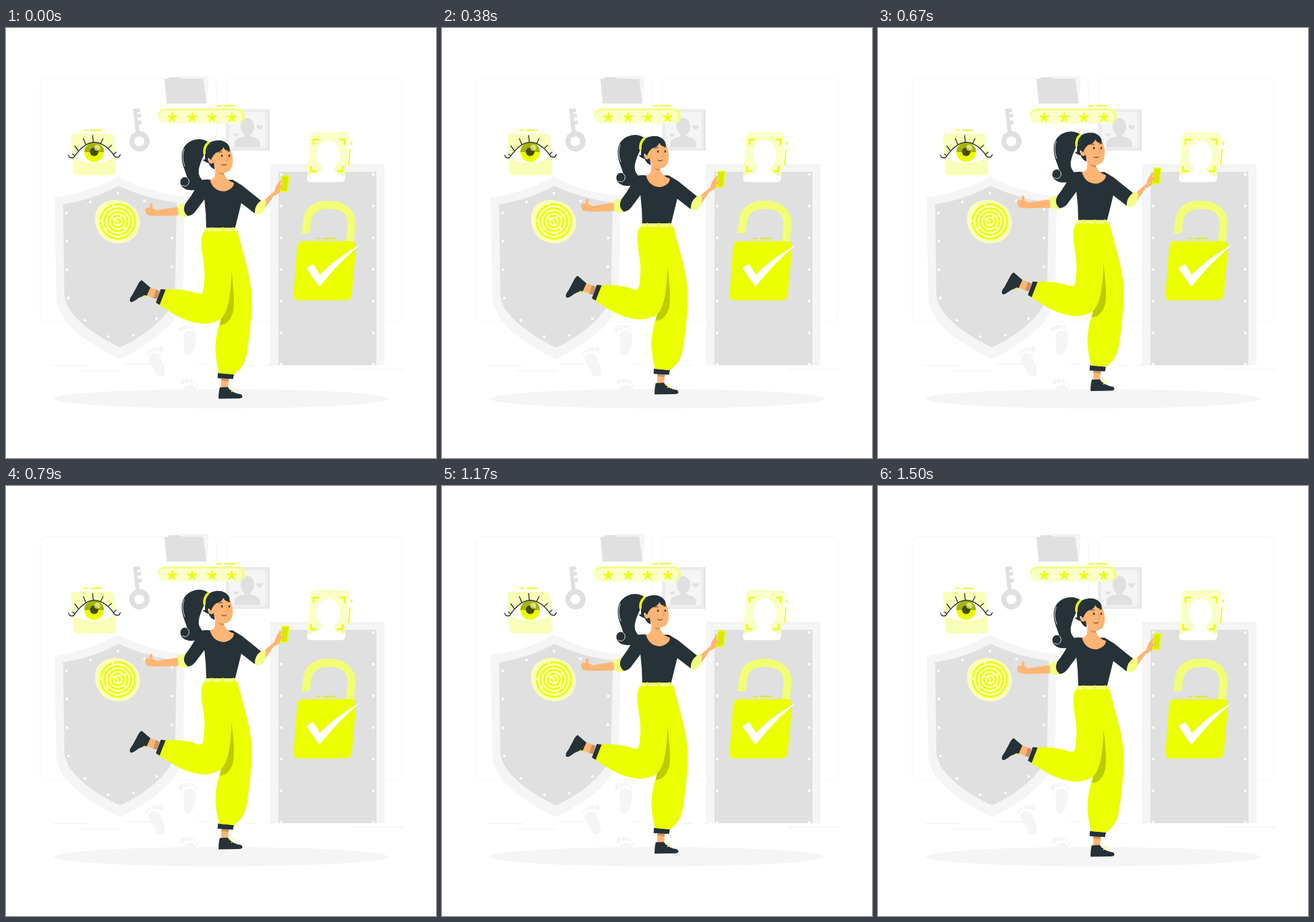
Recreate the animation shown at these times as an HTML page. Size 700 px wide and 700 px high, loop 1.54 s.

```html
<!DOCTYPE html>
<html lang="en">
<head>
<meta charset="utf-8">
<style>
  html, body { margin: 0; height: 100%; overflow: hidden; background: #fff; }
  svg { display: block; width: 100vw; height: 100vh; }
  .light { fill: #f5f5f5; }
  .grey { fill: #e0e0e0; }
  .yellow { fill: #ebff00; }
  .pale { fill: #f9ffb8; }
  .cuff { fill: #f3ff80; }
  .skin { fill: #ffb573; }
  .shade { fill: #cc915c; }
  .dark { fill: #263238; }
  .white { fill: #fff; }
  .line { fill: none; stroke-linecap: round; stroke-linejoin: round; }
  .glow { stroke: #ebff00; stroke-width: 2; }
  .ink { stroke: #263238; }
</style>
</head>
<body>
<svg viewBox="0 0 700 700">
  <!-- Room -->
  <g fill="none" stroke="#f5f5f5">
    <rect x="55.5" y="82.5" width="287" height="395.5" rx="9"/>
    <rect x="358.5" y="82.5" width="286" height="395.5" rx="9"/>
  </g>
  <path class="line" stroke="#ebebeb" stroke-width=".8" d="M76 549.5H132M121 558.5H186M193 546.5H238M313 546.5H325M392 549.5H407M425 549.5H432M563 555.5H649"/>
  <ellipse class="light" cx="350" cy="603.5" rx="272" ry="15.8"/>

  <!-- Folder -->
  <path class="light" d="M283 78H328L330 82 327 123H300Z"/>
  <path class="grey" d="M258 83H263L266 80H283L286 82.500H321L326.500 123H261.500Z"/>

  <!-- Portrait frame -->
  <path fill="#ebebeb" d="M358 132H429V200H358Z"/>
  <path class="grey" d="M427.500 132H429V200H427.500Z"/>
  <path class="light" d="M363.500 137H422.500V195H363.500Z"/>
  <g class="grey">
    <ellipse cx="393" cy="160.500" rx="11" ry="14"/>
    <path d="M372 194V187Q373 179 388 177V168H398V177Q413 179 413.500 187V194Z"/>
    <path id="heart" d="M413 166Q406 161 408 159 411 156 413 160 416 156 418 159 420 161 413 166"/>
    <use href="#heart" transform="translate(65 53) scale(.75)"/>
  </g>

  <!-- Key -->
  <g class="grey">
    <path d="M207 132 217 130.500 219 136.500 213.500 137.500 214 140 219.500 139.500 220 145 214.500 146 215 151 221 150.500 221.500 156 216 157 218 170H211Z"/>
    <circle cx="217.300" cy="184.500" r="16.500"/>
    <circle class="white" cx="217" cy="184.500" r="8"/>
  </g>

  <!-- Shield -->
  <path class="light" d="M182 242Q140 267 79 276L82 440C85 483 140 517 185 539 230 517 286 480 288 440L291 274Q232 268 182 242"/>
  <path class="grey" d="M183 257Q143 279 93 287L95 434C97 470 150 503 185 520 225 503 273 465 275 433L278 284Q228 278 183 257"/>

  <!-- Door -->
  <path class="light" d="M430 221H616V549H430Z"/>
  <path class="grey" d="M443.500 234H603V549H443.500Z"/>
  <g id="rivets" class="white"></g>

  <!-- Fingerprint -->
  <path class="pale" d="M145 309C146 288 163 279 180 280 204 281 218 299 218 317 217 339 201 351 182 350.500 160 350 144 332 145 309"/>
  <g id="rings" class="line" stroke="#ebff00" stroke-width="3.200"></g>

  <!-- Password -->
  <rect x="247" y="131" width="142" height="24.500" rx="12.200" fill="#faffc8"/>
  <path fill="#f3ff80" d="M259 131H377Q387 132 389 143 388 153 379 155 386 148 383 140 381 134 374 134H262Q252 134 247 143 248 133 259 131"/>
  <g id="stars" class="line" stroke="#ebff00" stroke-width="3"></g>
  <path class="line glow" d="M344 127H350M356 126.500H372M127 166.500H132M138 166.500H155M561.500 186V189.500M560 198 558 222"/>

  <!-- Eye -->
  <path class="pale" d="M113 172H168Q175 172 176 179L179.500 233Q180 240 173 240H117Q110 240 109.500 233L106 179Q106 172 113 172"/>
  <path class="white" d="M110 211Q127 186 144 186 163 187 178 209 164 219 144 219 124 220 110 211"/>
  <circle class="yellow" cx="143.500" cy="202" r="16"/>
  <path fill="#a5b300" d="M127.500 202A16 16 0 0 1 159.500 202Z"/>
  <circle fill="#474d00" cx="143.500" cy="201.500" r="7"/>
  <circle fill="#f9ffb8" opacity=".65" cx="148.500" cy="195" r="5"/>
  <path class="line ink" stroke-width="1.500" d="M102 207Q103 213 110 211 127 186 144 186 162 187 177 209 184 213 186 206M118 200 112 192M130 190 126 180M142 186 141 175M154 188 158 180M166 196 172 191M112 208 108 205M175 206 179 202"/>

  <!-- Face scan -->
  <path class="pale" opacity=".8" d="M502 169.500H552Q559 170 558 178L552.500 244Q552 251 545 251H496Q489 251 490 243L495 177Q496 170 502 169.500"/>
  <ellipse class="white" cx="525" cy="207" rx="19" ry="23.500"/>
  <path class="white" d="M515 222H534V231Q536 237 552 242L551.500 246Q551 251 545 251H496Q490 251 490 244 491 240 504 237 515 234 515 222"/>
  <path class="line" stroke="#ebff00" stroke-width="3" stroke-linecap="butt" d="M500.500 189V181.500H508M544 181.500H551.500L551 189M496.500 226 496 233H504M540 233H547.500L548.500 226"/>

  <!-- Padlock -->
  <path fill="#f3ff73" d="M481 334 484 312C487 291 502 281 525 281 552 281 569 297 569 317L566 350H553.500L556 317C556 303 546 294 525 294.500 507 295 499 302 497 313L494 334Z"/>
  <path class="yellow" d="M483 347H562Q571 348 570 357L563 434Q562 443 553 443.500H476Q467 443 468 434L474 356Q475 348 483 347"/>
  <path class="line" stroke="#dcee00" stroke-width="2" d="M507 342.500H512M518 342.500H535"/>
  <path class="white" d="M489 391 500 384 511 402Q536 375 577 352.500 541 382 510 421.500Z"/>

  <!-- Footprints -->
  <g class="light">
    <path d="M289 500C290 490 310 489 310 503 309 515 305 530 299 533 289 535 288 526 290 518Z"/>
    <path d="M233 542C229 530 244 525 251 534 253 543 259 553 259 562 256 570 246 569 243 560 241 553 236 550 233 542"/>
    <path d="M289 591C289 579 307 577 310 588Z"/>
  </g>
  <g id="toes" class="light"></g>

  <!-- Woman -->
  <g id="woman">
    <path class="dark" d="M330 186Q316 177 301 184C283 193 284 214 290 229Q294 240 295 244 290 241 286 245C280 252 287 265 303 264 319 264 325 255 319 247 314 240 309 235 322 207Z"/>
    <path class="line" stroke="#fff" stroke-width=".9" d="M290 197Q285 211 291 225M295 244Q300 248 297 254 293 260 287 256"/>

    <path class="skin" d="M284 291Q260 294 245 297L238 293Q240 286 236 285 233 286 234 293 228 291 228 294 225 294 227 298 227 304 232 305L246 306 285 305Z"/>
    <path class="skin" d="M417 283 437 266Q439 255 447 249L450 254 448 265Q443 271 436 273L422 293Z"/>
    <path class="yellow" d="M448.500 240 461 239.500 459 266.500 446 267.500Z"/>
    <path fill="#d7e900" d="M450 242 459.500 241.500 457.500 264.500 448 265.500Z"/>
    <path class="skin" d="M440 257 447 247 448 250 446 257 450 256 451 259 445 263Z"/>

    <path class="shade" d="M239 424 250 428 246 441 240 440Z"/>
    <path class="skin" d="M234 422 244 426 240 440 229 435Z"/>
    <path class="dark" d="M221 410.500 235 422.500 229 436Q219 436 211 443 204 448 202 445 200 441 206 434L214 419Q217 412 221 410.500"/>
    <path class="line" stroke="#ebff00" stroke-width="1.500" d="M223 437Q228 434 228 438"/>
    <path class="dark" d="M252 425 260.500 426 252 452 244 447Z"/>

    <path class="skin" d="M351 569H363L361 588H350Z"/>
    <path class="shade" d="M351 570H363L362 575 350.500 574Z"/>
    <path class="dark" d="M348 585 361 584.500Q369 595 383 596.500 388 602 380 603L346 603.500Q346 592 348 585"/>
    <path class="line" stroke="#f3ff80" stroke-width="1.500" d="M364 588Q371 584 372 590L367 592"/>
    <path class="dark" d="M345 561.500 371 564 369.500 571.500 344.500 570Z"/>

    <path class="yellow" d="M323 330C314 342 319 362 321 378 325 400 322 411 322 421 321 433 317 434 311 432 290 425 273 425 260 425.500L250 451C277 470 297 479 319 481.500Q338 482 350 473C343 495 341 510 341 523 342 541 344 552 347 562L371 564C386 553 391 541 393 523Q400 480 400 437C398 401 386 370 377 330Z"/>
    <path fill="#bccc00" d="M367 395Q373 441 370 461 364 483 348 483.500L350 473Q366 459 367 395"/>

    <path class="cuff" d="M278 290Q284 285 294 286 288 297 297 307 288 309 280 305 281 297 278 290"/>
    <path class="cuff" d="M413 281Q418 278 423 281 424 301 410 304L404 301Q403 290 413 281"/>
    <path class="dark" d="M320 247Q326 246 334 247H369L384 256 415 281Q404 289 405 302L383 285 373 325.500H326Q326 302 323 279L311 295Q305 305 296 306 286 298 292 286 303 272 310 258 314 249 320 247"/>
    <path class="skin" d="M341 226 340 241Q338 246 332 247 337 266 356 266 371 262 371 252 358 248 355 237V225Z"/>
    <path class="shade" d="M345 234Q350 237 355 235.500L354 239Q348 239 345 234"/>
    <path class="cuff" d="M325 325H374L376 331H323Z"/>
    <path class="line" stroke="#ebff00" stroke-width="2" d="M334.500 325V331M353 325V331M370 325 371 331"/>

    <path class="skin" d="M334 204Q341 193 352 192L365 198C372 213 370 230 361 234Q349 239 341 228L337 221Q330 221 329 215 331 210 335 213Z"/>
    <path class="dark" d="M324 205C320 191 334 182 347 183 357 183 366 191 364 200Q356 200 354 194 350 202 342 203 336 208 334 215 326 207 330 218 333 223 338 219L340 230Q333 228 330 220 323 218 320 214 324 215 324 213Z"/>
    <path class="line" stroke="#ebff00" stroke-width="4" stroke-linecap="butt" d="M329 187Q322 193 323 204"/>
    <path class="line" stroke="#263238" stroke-width="1" d="M347 203Q349 200 352 202M361 201 365 200M351 222Q355 225 359 222"/>
    <path class="line" stroke="#e8945b" stroke-width="1" d="M359 208Q362 214 361 216L358 216"/>
    <ellipse class="dark" cx="351.500" cy="208" rx="1.300" ry="2"/>
    <ellipse class="dark" cx="363.500" cy="208" rx="1.300" ry="2"/>
  </g>
</svg>
<script>
const byId = id => document.getElementById(id);
const dots = (id, points, rx, ry = rx) => {
  byId(id).innerHTML += points.map(([x, y]) =>
    `<ellipse cx="${x}" cy="${y}" rx="${rx}" ry="${ry}"/>`).join('');
};

dots('rivets', [
  [182, 269], [137.500, 283], [225.500, 281.500], [98.500, 301], [270.500, 295.500],
  [99, 347], [270.500, 342], [99.500, 393.500], [270, 388.500], [101.500, 439.500],
  [128.500, 476], [166.500, 502.500], [207.500, 500], [245, 473], [269, 437]
], 2.200);
for (let i = 0; i < 7; i++) {
  const y = 238.500 + i * 51.500;
  dots('rivets', [[448, y], [598, y]], 2.200);
}

// Toes fan out above each sole.
const foot = (x, y, angle) => {
  const tips = [[-13, 3], [-6, 0], [0, -1], [6, 0], [11, 4]];
  byId('toes').innerHTML += tips.map(([dx, dy], i) =>
    `<ellipse cx="${dx}" cy="${dy}" rx="${3.400 - i * .45}" ry="${4.500 - i * .55}"
      transform="translate(${x} ${y}) rotate(${angle})"/>`).join('');
};
foot(297.500, 487, 0);
byId('toes').innerHTML += [[252.500, 523.500, 4, 5], [245.500, 522.500, 2.800, 4],
  [239.500, 523.500, 2.400, 3.500], [234, 526.500, 2.200, 3], [230, 530.500, 1.800, 2.300]]
  .map(([x, y, rx, ry]) => `<ellipse cx="${x}" cy="${y}" rx="${rx}" ry="${ry}"/>`).join('');
foot(301, 575.500, 10);

byId('rings').innerHTML = [3.500, 9.500, 15.500, 21.500, 28].map((r, i) => {
  const arc = r * 2.090;
  return `<circle cx="182" cy="315" r="${r}" stroke-dasharray="${arc - 5} 5 ${arc * .5} 5 ${arc * 1.500 - 5} 0"
    transform="rotate(${i * 107} 182 315)"/>`;
}).join('');

byId('stars').innerHTML = [270.500, 303, 335, 367.500].map(x =>
  [0, 1, 2, 3, 4].map(i =>
    `<path d="M${x} 145.500v-6.500" transform="rotate(${i * 72} ${x} 145.500)"/>`).join('')).join('');

// Steady rise and fall, stepped at 24 pictures per second.
const LOOP = 1540, STEP = 1000 / 24, HALF = 750, RISE = 14;
const height = ms => RISE * (1 - Math.abs(ms % (2 * HALF) - HALF) / HALF);
const woman = byId('woman');
function draw(now) {
  const step = Math.floor((now % LOOP + 5) / STEP);
  const y = height(30) - height(step * STEP + 30);
  woman.setAttribute('transform', `translate(0 ${y.toFixed(2)})`);
  requestAnimationFrame(draw);
}
draw(performance.now());
</script>
</body>
</html>
```
